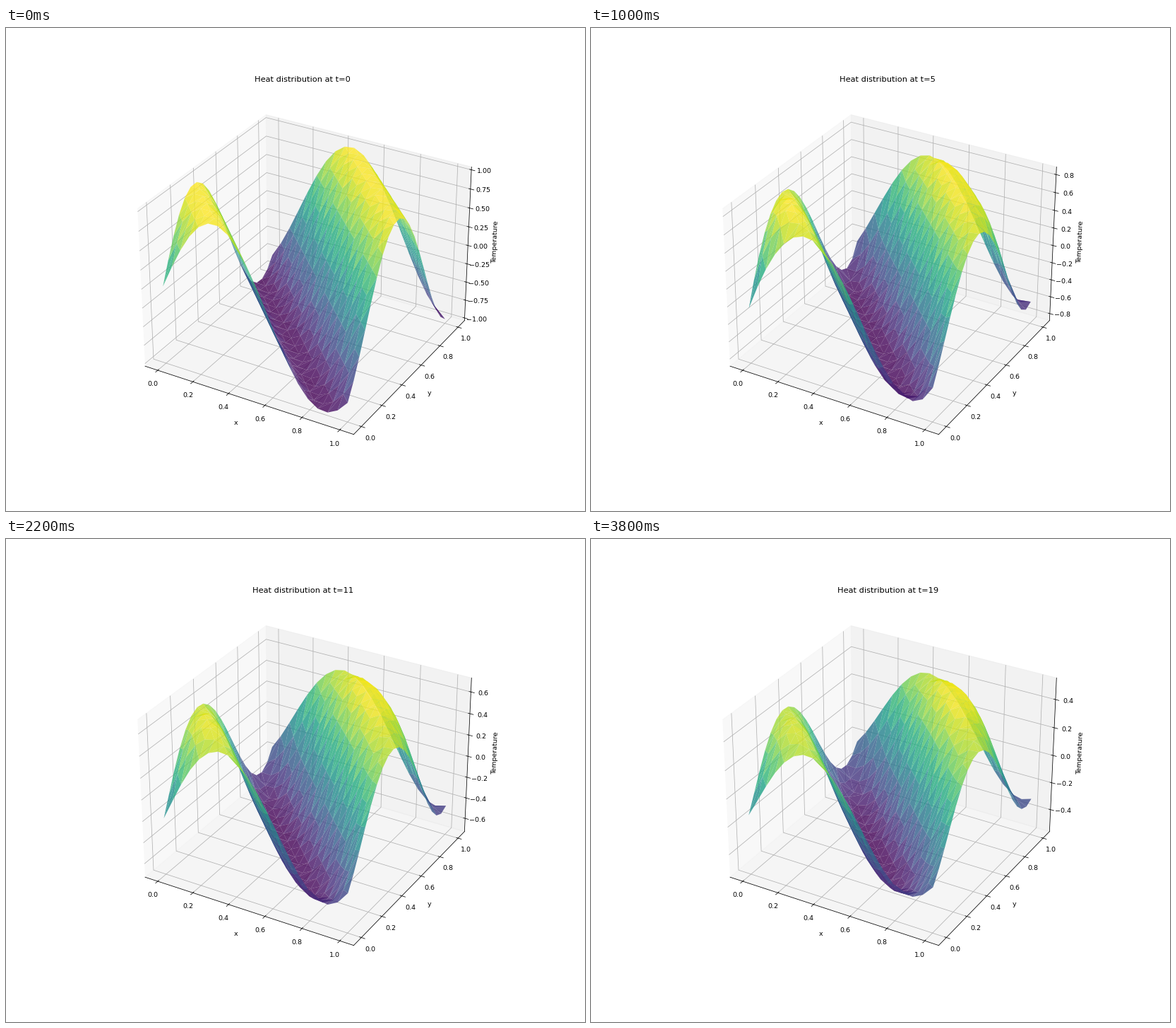
A matplotlib script that plays this animation: 820x683 px, repeating every 4 s.

```python
import numpy as np
import matplotlib.pyplot as plt
from matplotlib.animation import FuncAnimation
from matplotlib.ticker import MaxNLocator
from matplotlib.tri import Triangulation

W, H, DPI = 820, 683, 68
N = 20            # grid points per side
STEPS = 20        # time steps in one loop
WAVE = 5.39       # wave number of the starting heat wave
RATE = 0.196      # diffusion number of the explicit scheme

plt.rcParams["font.size"] = 10.05

axis = np.linspace(0, 1, N)
X, Y = np.meshgrid(axis, axis)
mesh = Triangulation(X.ravel(), Y.ravel())
z_locator = MaxNLocator(nbins=9, steps=[1, 2, 2.5, 5, 10])


def diffuse(u):
    """One explicit heat step on a periodic grid."""
    around = sum(np.roll(u, d, axis=a) for d in (1, -1) for a in (0, 1))
    return u + RATE * (around - 4 * u)


def padded(lo, hi):
    pad = (hi - lo) / 48
    return lo - pad, hi + pad


fields = [np.sin(WAVE * (X + Y))]
while len(fields) < STEPS:
    fields.append(diffuse(fields[-1]))

fig = plt.figure(figsize=(W / DPI, H / DPI), dpi=DPI)
ax = fig.add_subplot(projection="3d")
ax.set_xlim(*padded(-0.05, 1.05))
ax.set_ylim(*padded(-0.05, 1.05))
ax.set_xlabel("x")
ax.set_ylabel("y")
ax.set_zlabel("Temperature")


def draw(t):
    for old in list(ax.collections):
        old.remove()
    u = fields[t]
    lo, hi = padded(u.min(), u.max())
    ticks = z_locator.tick_values(u.min(), u.max())
    ax.plot_trisurf(mesh, u.ravel(), cmap="viridis", alpha=0.8,
                    linewidth=0.2, antialiased=True)
    ax.set_zticks([v for v in ticks if lo <= v <= hi])
    ax.set_zlim(lo, hi)
    ax.set_title(f"Heat distribution at t={t}")


anim = FuncAnimation(fig, draw, frames=STEPS, interval=200, repeat=True)
plt.show()
```
